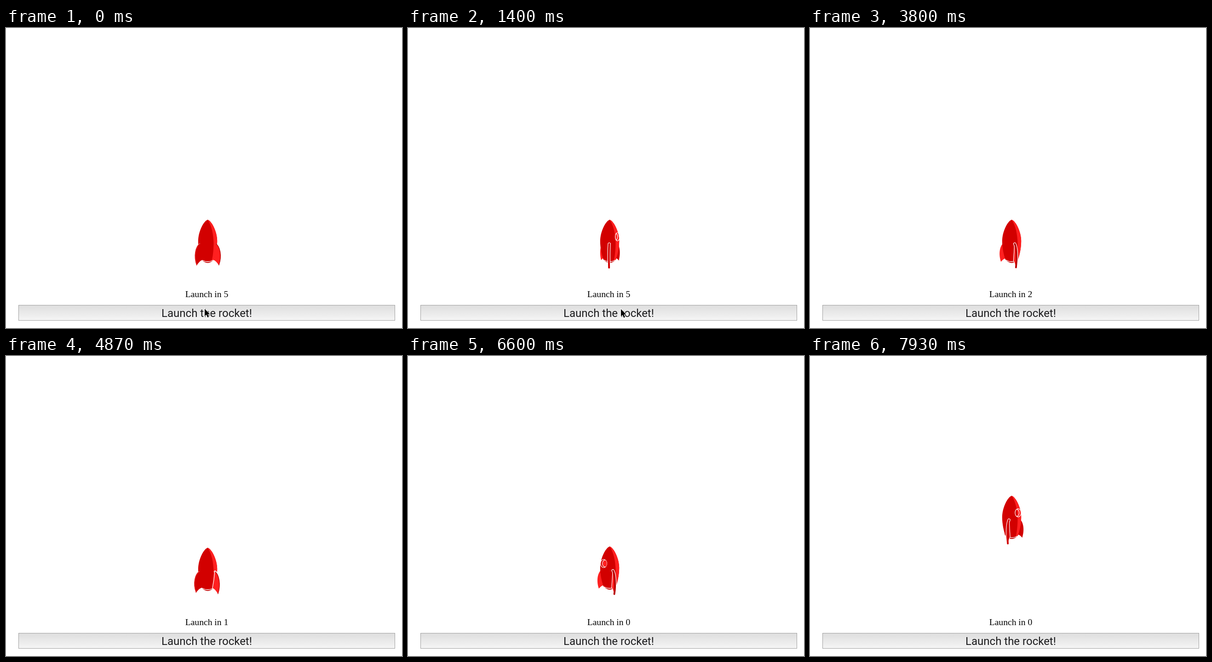
Animation of 861 by 651 pixels, one loop 8 s. Source, as an HTML page with a canvas:

```html
<!DOCTYPE html>
<html lang="en">
<head>
<meta charset="utf-8">
<title>Rocket launch</title>
<style>
  html, body { margin: 0; width: 100%; height: 100%; overflow: hidden; background: #fff; }
  canvas { display: block; }
</style>
</head>
<body>
<canvas id="stage" width="861" height="651"></canvas>
<script>
const ctx = document.getElementById('stage').getContext('2d');
const LOOP = 8000, TAU = Math.PI * 2;
const DARK = '#d20000', BRIGHT = '#ff2020', RIM_DARK = '#b80000', RIM_LIGHT = '#e83030';
const clamp = (v, a = 0, b = 1) => Math.min(b, Math.max(a, v));

// Piecewise linear value through [time, value] pairs.
function track(keys, t) {
  if (t <= keys[0][0]) return keys[0][1];
  for (let i = 1; i < keys.length; i++) {
    const [t0, a] = keys[i - 1], [t1, b] = keys[i];
    if (t <= t1) return a + (b - a) * (t - t0) / (t1 - t0);
  }
  return keys[keys.length - 1][1];
}

// The rocket swings half a turn each way about its long axis, in about 1.5 s.
const SWING = [[0, 0.117], [1400, 1.051], [2800, 2.009], [4870, 3.393],
  [5800, 4], [7270, 4.984], [7930, 5.46], [8000, 5.508]];
const CURSOR_X = [[930, 432], [1330, 463], [1450, 463], [1700, 466]];
const CURSOR_Y = [[930, 609.5], [1400, 610], [1450, 612], [1700, 655]];

const turn = t => Math.PI * Math.sin(TAU * track(SWING, t));
const climb = t => t < 6450 ? 0 : 43 * Math.pow((t - 6450) / 820, 1.63);
const count = t => clamp(5 - Math.floor((t - 530) / 1000), 0, 5);

// Point at radius r, height y and angle a, seen a little from above.
function project(r, y, a) {
  const c = Math.cos(a);
  return [r * Math.sin(a) * (1 + 0.25 * c * r / 28), y + 0.42 * (y - 40) / 53.5 * r * c];
}

function bodyPath() {
  ctx.beginPath();
  ctx.moveTo(0, 0);
  ctx.bezierCurveTo(10, 4, 20.5, 27, 20.7, 46);
  ctx.bezierCurveTo(20.7, 62, 17, 78, 13, 88);
  ctx.quadraticCurveTo(0, 94, -13, 88);
  ctx.bezierCurveTo(-17, 78, -20.7, 62, -20.7, 46);
  ctx.bezierCurveTo(-20.5, 27, -10, 4, 0, 0);
}

function outerEdge(at) {
  ctx.moveTo(...at(18.5, 51));
  ctx.bezierCurveTo(...at(27, 56), ...at(32, 74), ...at(25, 93.5));
}

function fin(a) {
  const s = Math.sin(a), c = Math.cos(a);
  const at = (r, y) => project(r, y, a);
  const rim = 4 * Math.max(0, c);
  const face = () => {
    ctx.beginPath();
    outerEdge(at);
    ctx.quadraticCurveTo(...at(18, 85), ...at(13, 85));
    ctx.quadraticCurveTo(...at(17, 68), ...at(18.5, 51));
    ctx.closePath();
  };
  ctx.lineJoin = ctx.lineCap = 'round';
  if (c > 0.58) {
    ctx.strokeStyle = '#fff';
    ctx.lineWidth = 2.4;
    face();
    ctx.stroke();
    ctx.lineWidth = rim + 2.4;
    ctx.beginPath();
    outerEdge(at);
    ctx.stroke();
  } else if (c > 0) {
    const [x, y] = at(18.5, 51);
    ctx.strokeStyle = '#fff';
    ctx.lineWidth = 1.2;
    ctx.beginPath();
    ctx.moveTo(x, y);
    ctx.lineTo(x + 3 * Math.sign(s), y + 2.5);
    ctx.stroke();
  }
  ctx.fillStyle = s * c > 0 ? BRIGHT : DARK;
  face();
  ctx.fill();
  if (rim > 0.2) {
    ctx.strokeStyle = s > 0.2 ? RIM_DARK : s < -0.65 ? RIM_LIGHT : DARK;
    ctx.lineWidth = Math.abs(s) > 0.65 ? Math.min(rim, 1.3) : rim;
    ctx.beginPath();
    outerEdge(at);
    ctx.stroke();
  }
}

function porthole(a) {
  const c = Math.cos(a), s = Math.sin(a), deg = a * 180 / Math.PI;
  if (c < 0.15) return;
  const ring = (x, r) => {
    ctx.beginPath();
    ctx.ellipse(x, 37, r * c, r, 0, 0, TAU);
  };
  ctx.save();
  bodyPath();
  ctx.clip();
  ctx.strokeStyle = '#fff';
  ctx.lineWidth = 1.2;
  const x = 20 * s, inner = 15.5 * s;
  ring(x, 9);
  ctx.stroke();
  ctx.clip();
  ring(inner, 7.6);
  if (deg < 30) {
    const split = clamp(0.65 - deg / 14);
    const g = ctx.createLinearGradient(inner - 7.6 * c, 0, inner + 7.6 * c, 0);
    g.addColorStop(0, split > 0 ? BRIGHT : DARK);
    g.addColorStop(split, split > 0 ? BRIGHT : DARK);
    g.addColorStop(split, split < 1 ? DARK : BRIGHT);
    g.addColorStop(1, split < 1 ? DARK : BRIGHT);
    ctx.fillStyle = g;
    ctx.fill();
  }
  ctx.stroke();
  ctx.restore();
}

function rocket(a, y) {
  ctx.save();
  ctx.translate(438.5, y);
  const fins = [a - Math.PI / 3, a + Math.PI / 3, a + Math.PI]
    .sort((p, q) => Math.cos(p) - Math.cos(q));
  fins.filter(f => Math.cos(f) < 0).forEach(fin);

  ctx.fillStyle = '#c40000';
  ctx.beginPath();
  ctx.moveTo(-11, 89);
  ctx.quadraticCurveTo(0, 98.5, 11, 89);
  ctx.fill();

  ctx.fillStyle = DARK;
  bodyPath();
  ctx.fill();

  ctx.fillStyle = BRIGHT;
  ctx.beginPath();
  ctx.moveTo(0, 0);
  ctx.bezierCurveTo(10, 4, 20.5, 27, 20.7, 46);
  ctx.bezierCurveTo(20.7, 62, 17, 78, 13, 88);
  ctx.lineTo(9, 89.6);
  ctx.bezierCurveTo(11, 80, 13, 66, 13, 50);
  ctx.bezierCurveTo(12.5, 34, 9, 12, 0, 0);
  ctx.fill();

  ctx.strokeStyle = '#fff';
  ctx.lineWidth = 1.3;
  ctx.beginPath();
  ctx.moveTo(-13, 87.5);
  ctx.quadraticCurveTo(0, 94.5, 13, 87.5);
  ctx.stroke();

  porthole(a);
  fins.filter(f => Math.cos(f) >= 0).forEach(fin);
  ctx.restore();
}

function button(pressed) {
  const g = ctx.createLinearGradient(0, 602, 0, 634);
  g.addColorStop(0, pressed ? '#c4c4c4' : '#dedede');
  g.addColorStop(1, pressed ? '#dcdcdc' : '#f5f5f5');
  ctx.fillStyle = g;
  ctx.fillRect(27, 601, 819, 34);
  ctx.strokeStyle = '#a0a0a0';
  ctx.lineWidth = 1;
  ctx.strokeRect(27.5, 601.5, 818, 33);
  ctx.fillStyle = '#1c1c1e';
  ctx.font = '24px Roboto, sans-serif';
  ctx.fillText('Launch the rocket!', 436.5, 626.5);
}

function cursor(x, y) {
  if (y > 651) return;
  ctx.save();
  ctx.translate(x, y);
  ctx.beginPath();
  ctx.moveTo(0, 0);
  ctx.lineTo(0, 16);
  ctx.lineTo(3.7, 12.6);
  ctx.lineTo(6.2, 18.6);
  ctx.lineTo(8.9, 17.5);
  ctx.lineTo(6.4, 11.6);
  ctx.lineTo(11.3, 11.4);
  ctx.closePath();
  ctx.lineJoin = 'miter';
  ctx.strokeStyle = '#fff';
  ctx.lineWidth = 2;
  ctx.stroke();
  ctx.fillStyle = '#000';
  ctx.fill();
  ctx.restore();
}

function draw(t) {
  ctx.fillStyle = '#fff';
  ctx.fillRect(0, 0, 861, 651);
  ctx.textAlign = 'center';
  rocket(turn(t), 416 - climb(t));
  ctx.fillStyle = '#000';
  ctx.font = '19.6px "Liberation Serif", serif';
  ctx.fillText('Launch in ' + count(t), 436.5, 584);
  button(t >= 430 && t < 530);
  cursor(track(CURSOR_X, t), track(CURSOR_Y, t));
}

const start = performance.now();
function tick() {
  draw((performance.now() - start) % LOOP);
  requestAnimationFrame(tick);
}
tick();
</script>
</body>
</html>
```
